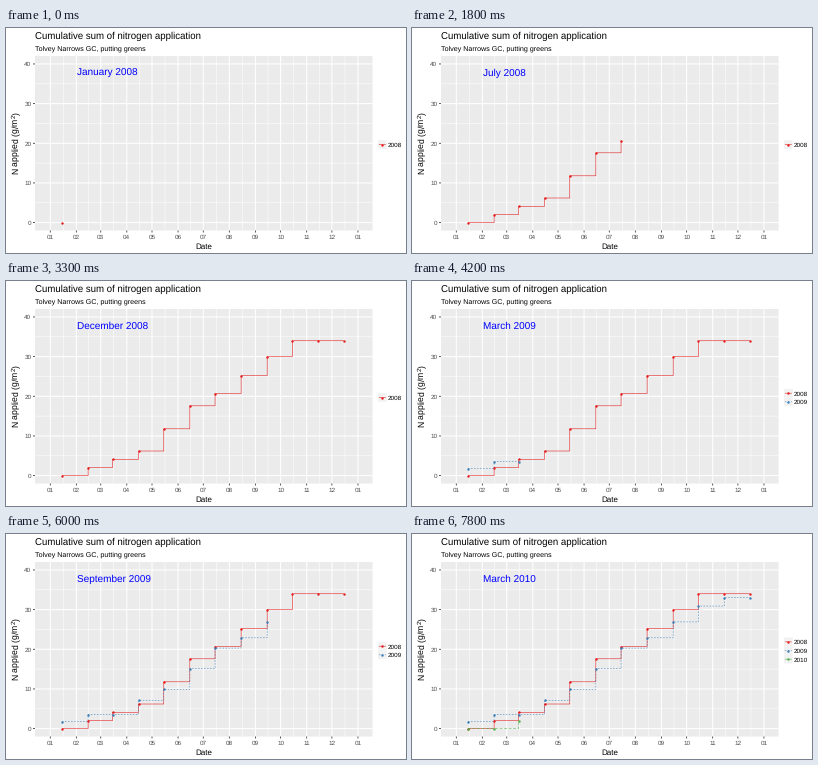
Animation, 400 px wide and 225 px high, one loop 8000 ms. Source, as a matplotlib script:

```python
import matplotlib.pyplot as plt
from matplotlib.animation import FuncAnimation
from matplotlib.patches import Rectangle

plt.rcParams.update({
    "font.family": "Liberation Sans",
    "mathtext.fontset": "custom",
    "mathtext.rm": "Liberation Sans",
    "text.hinting": "none",
    "path.snap": False,
    "lines.dash_capstyle": "butt",
    "lines.scale_dashes": False,
})

W, H, DPI = 400, 225, 100
PT = 72 / DPI  # points per pixel
LEFT, RIGHT, TOP, BOTTOM = 29, 366.5, 28, 202.5
MONTH_MS, STEP_MS, LOOP_MS = 300, 100, 8000

MONTHS = ["January", "February", "March", "April", "May", "June", "July",
          "August", "September", "October", "November", "December"]
MONTH_STARTS = [0, 31, 60, 91, 121, 152, 182, 213, 244, 274, 305, 335, 366]

# year: (colour, dash pattern in pixels, cumulative nitrogen by month)
SERIES = {
    2008: ("#E41A1C", None,
           [0, 2.0, 4.1, 6.2, 11.8, 17.6, 20.7, 25.2, 30, 34, 34, 34]),
    2009: ("#377EB8", (1.5, 1.5),
           [1.75, 3.55, 3.55, 7.1, 9.9, 15.1, 20.3, 22.9, 26.9, 30.9, 33, 33]),
    2010: ("#4DAF4A", (3, 1.5), [0, 0, 1.8]),
}


def day_x(day):
    return 44.3 + 0.8406 * day


def value_y(value):
    return 194.6 - 3.966 * value


fig = plt.figure(figsize=(W / DPI, H / DPI), dpi=DPI, facecolor="white")
ax = fig.add_axes([0, 0, 1, 1])
ax.set(xlim=(0, W), ylim=(H, 0))
ax.axis("off")


def label(x, y, text, size, color="black", **kw):
    return ax.text(x, y, text, fontsize=size * PT, color=color,
                   va="baseline", **kw)


def stroke(xs, ys, color, width, **kw):
    return ax.plot(xs, ys, color=color, lw=width * PT,
                   solid_capstyle="butt", **kw)[0]


def series_line(color, dash, zorder):
    line = stroke([], [], color, 0.55, zorder=zorder)
    if dash:
        line.set_dashes([d * PT for d in dash])
    return line


def series_dots(color, zorder):
    return ax.plot([], [], "o", color=color, ms=2.4 * PT, mew=0,
                   zorder=zorder)[0]


def draw_panel():
    ax.add_patch(Rectangle((LEFT, TOP), RIGHT - LEFT, BOTTOM - TOP,
                           fc="#EBEBEB", lw=0, zorder=0))
    for a, b in zip(MONTH_STARTS, MONTH_STARTS[1:]):
        x = day_x((a + b) / 2)
        stroke([x, x], [TOP, BOTTOM], "white", 0.53, zorder=1)
    for value in range(5, 40, 10):
        stroke([LEFT, RIGHT], [value_y(value)] * 2, "white", 0.53, zorder=1)
    for i, day in enumerate(MONTH_STARTS):
        x = day_x(day)
        stroke([x, x], [TOP, BOTTOM], "white", 1.07, zorder=1)
        stroke([x, x], [BOTTOM, BOTTOM + 2], "#333333", 0.8)
        label(x, 211.2, f"{i % 12 + 1:02d}", 6.4, "#4D4D4D", ha="center")
    for value in range(0, 41, 10):
        y = value_y(value)
        stroke([LEFT, RIGHT], [y, y], "white", 1.07, zorder=1)
        stroke([LEFT - 2, LEFT], [y, y], "#333333", 0.8)
        label(25.4, y + 2.3, str(value), 6.4, "#4D4D4D", ha="right")


draw_panel()
label(29, 11, "Cumulative sum of nitrogen application", 9.6)
label(29, 22.8, "Tolvey Narrows GC, putting greens", 7.2)
label((LEFT + RIGHT) / 2, 221, "Date", 8, ha="center")
label(13, (TOP + BOTTOM) / 2, r"N applied $\mathrm{(g/m^2)}$", 8.6,
      rotation=90, rotation_mode="anchor", ha="center")
month_text = label(70.6, 47.8, "", 9.96, "blue", zorder=6)


class YearPlot:
    """Stepped curve, its points and its legend entry."""

    def __init__(self, year, color, dash, values):
        self.values = values
        self.line = series_line(color, dash, 3)
        self.dots = series_dots(color, 4)
        self.key = ax.add_patch(Rectangle((372, 0), 8.64, 8.64,
                                          fc="#F2F2F2", lw=0, zorder=2))
        self.key_line = series_line(color, dash, 3)
        self.key_dot = series_dots(color, 4)
        self.name = label(382, 0, str(year), 6.4)

    def show(self, count, key_y):
        count = max(0, min(count, len(self.values)))
        xs = [day_x(day + 14) for day in MONTH_STARTS[:count]]
        ys = [value_y(v) for v in self.values[:count]]
        step_x = [x for x in xs for _ in (0, 1)][1:]
        step_y = [y for y in ys for _ in (0, 1)][:-1]
        self.line.set_data(step_x, step_y)
        self.dots.set_data(xs, ys)

        self.key.set_y(key_y - 4.32)
        self.key_line.set_data([372.9, 379.8], [key_y, key_y])
        self.key_dot.set_data([376.3], [key_y])
        self.name.set_y(key_y + 2.3)
        for part in (self.key, self.key_line, self.key_dot, self.name):
            part.set_visible(count > 0)


plots = [YearPlot(year, *spec) for year, spec in SERIES.items()]


def update(frame):
    month = frame * STEP_MS // MONTH_MS
    current = month // 12
    month_text.set_text(f"{MONTHS[month % 12]} {2008 + current}")
    for i, plot in enumerate(plots):
        plot.show(month + 1 - 12 * i, 116.5 + 8.64 * (i - current / 2))
    return []


anim = FuncAnimation(fig, update, frames=LOOP_MS // STEP_MS,
                     interval=STEP_MS, repeat=True, repeat_delay=0)
plt.show()
```
